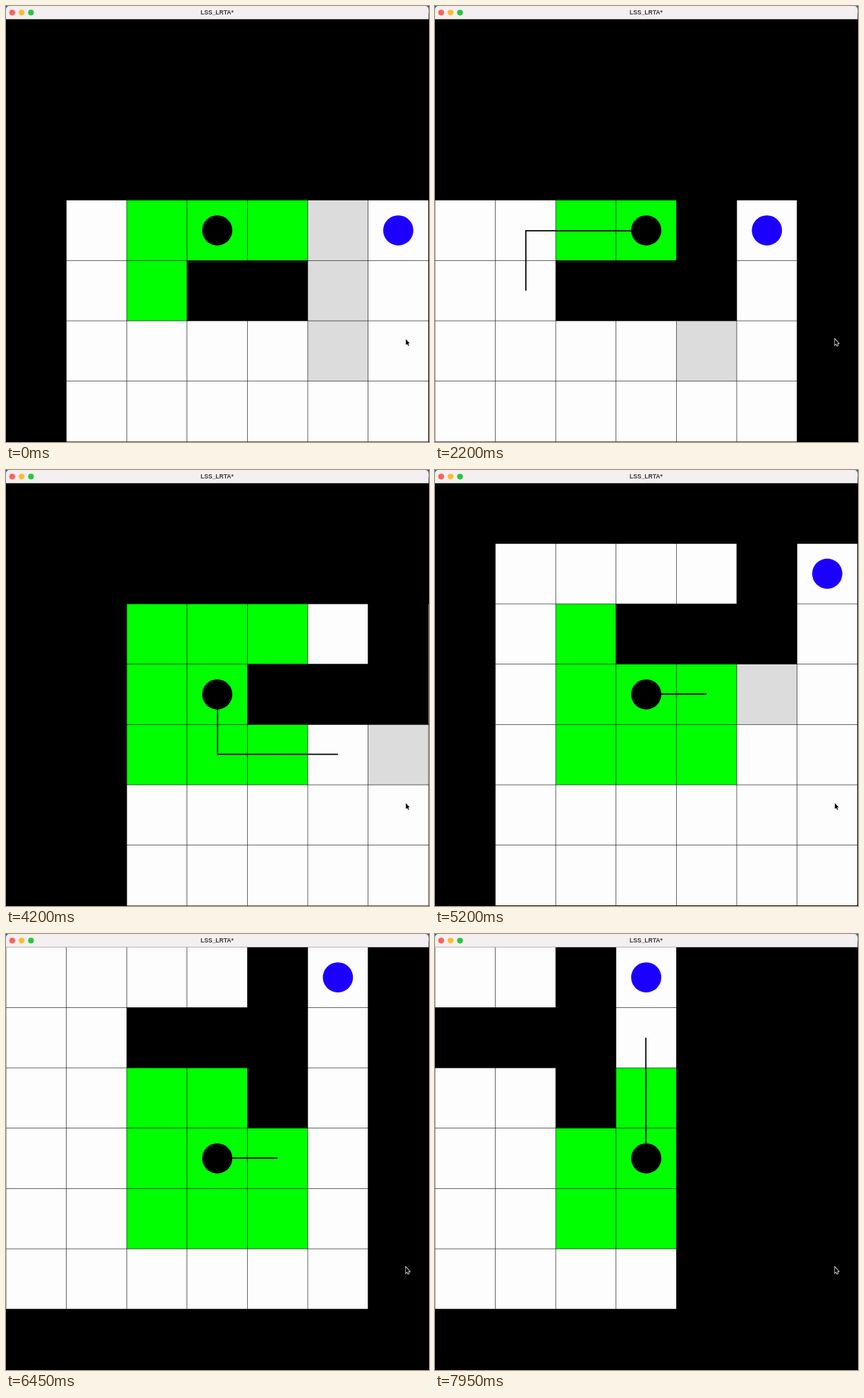
These frames come from a looping animation (600 px wide and 619 px high, 8000 ms). An HTML page with a canvas:

```html
<!DOCTYPE html>
<html lang="en">
<head>
<meta charset="utf-8">
<title>LSS_LRTA*</title>
<style>
html, body { margin: 0; width: 100%; height: 100%; overflow: hidden; background: #000; }
canvas { display: block; }
</style>
</head>
<body>
<canvas id="stage" width="600" height="619"></canvas>
<script>
const ctx = document.getElementById('stage').getContext('2d');
const LOOP = 8000, SIZE = 6, CENTRE = 3;
const CELL_W = 85.6, CELL_H = 85.65, TOP = 18.75, LINE = 0.6;
const GOAL = [5, 0];
const WALLS = [[2, 1], [3, 1], [4, 0], [4, 1], [4, 2]];

// Start time, then the route still ahead as "column row" digits; the first cell is the agent.
const STEPS = [
  [0, '20'],
  [950, '20 30 40 50'],
  [1450, '30 40 50'],
  [1900, '30 20 10 11'],
  [2350, '20 10 11'],
  [2850, '10 11'],
  [3400, '11'],
  [3950, '11 12 22 32'],
  [4400, '12 22 32'],
  [4950, '22 32'],
  [5400, '32'],
  [5900, '32 33 43'],
  [6450, '33 43'],
  [6900, '43'],
  [7400, '43 53 52 51'],
  [7850, '53 52 51'],
].map(([start, route]) => ({ start, route: route.split(' ').map(cell => [...cell].map(Number)) }));

const toX = col => col * CELL_W;
const toY = row => TOP + row * CELL_H;
const near = (a, b) => Math.abs(a[0] - b[0]) <= 1 && Math.abs(a[1] - b[1]) <= 1;

function disc(x, y, radius, color) {
  ctx.fillStyle = color;
  ctx.beginPath();
  ctx.arc(x, y, radius, 0, 7);
  ctx.fill();
}

function drawGridLines(left, top) {
  ctx.fillStyle = '#000';
  for (let i = 0; i <= SIZE; i++) {
    ctx.fillRect(toX(left + i) - LINE / 2, 0, LINE, 619);
    ctx.fillRect(0, toY(top + i) - LINE / 2, 600, LINE);
  }
}

function drawRoute(points) {
  ctx.strokeStyle = '#000';
  ctx.lineWidth = 1.7;
  for (let i = 1; i < points.length; i++) {
    const [ax, ay] = points[i - 1], [bx, by] = points[i];
    // each stroke lies slightly left of its direction of travel
    const ox = Math.sign(Math.round(by - ay)) * 0.5;
    const oy = -Math.sign(Math.round(bx - ax)) * 0.5;
    ctx.beginPath();
    ctx.moveTo(ax + ox, ay + oy);
    ctx.lineTo(bx + ox, by + oy);
    ctx.stroke();
  }
}

function drawTitleBar() {
  ctx.fillStyle = '#2c6390';
  ctx.fillRect(0, 0, 600, 10);
  ctx.fillStyle = '#f4eff1';
  ctx.beginPath();
  ctx.roundRect(0, 0, 599.5, TOP, [5, 5, 0, 0]);
  ctx.fill();
  ['#ff5f57', '#febc2e', '#28c840'].forEach((color, i) => disc(8.8 + i * 13.3, 9.3, 4.1, color));
  ctx.fillStyle = '#3b383a';
  ctx.font = 'bold 8.5px "Liberation Sans", sans-serif';
  ctx.textAlign = 'center';
  ctx.fillText('LSS_LRTA*', 299.4, 12.2);
}

function drawPointer() {
  ctx.beginPath();
  [[0, 0], [0, 8.4], [1.8, 6.7], [3.1, 9.7], [4.4, 9.1], [3.2, 6.2], [5.5, 6]]
    .forEach(([x, y]) => ctx.lineTo(567.2 + x, 472.9 + y));
  ctx.closePath();
  ctx.lineWidth = 1.4;
  ctx.strokeStyle = '#fff';
  ctx.stroke();
  ctx.fillStyle = '#000';
  ctx.fill();
}

function draw(time) {
  const past = STEPS.filter(step => step.start <= time);
  const { route } = past[past.length - 1];
  const agent = route[0];
  const left = CENTRE - agent[0], top = CENTRE - agent[1];
  const middle = ([col, row]) => [toX(left + col + 0.5), toY(top + row + 0.5)];

  ctx.fillStyle = '#000';
  ctx.fillRect(0, 0, 600, 619);

  // additive fills keep fractional edges between neighbours free of seams
  ctx.globalCompositeOperation = 'lighter';
  for (let row = 0; row < SIZE; row++) {
    for (let col = 0; col < SIZE; col++) {
      const cell = [col, row];
      const wall = WALLS.some(([c, r]) => c === col && r === row);
      const seen = past.some(step => near(step.route[0], cell));
      if (wall && seen) continue;
      ctx.fillStyle = wall ? '#dcdcdc' : near(agent, cell) ? '#0f0' : '#fefdfe';
      ctx.fillRect(toX(left + col), toY(top + row), CELL_W, CELL_H);
    }
  }
  ctx.globalCompositeOperation = 'source-over';

  drawGridLines(left, top);
  disc(...middle(GOAL), 21.4, '#1c00ff');
  drawRoute(route.map(middle));
  disc(...middle(agent), 21.4, '#000');
  drawTitleBar();
  drawPointer();
}

function tick() {
  draw(performance.now() % LOOP);
  requestAnimationFrame(tick);
}
tick();
</script>
</body>
</html>
```
